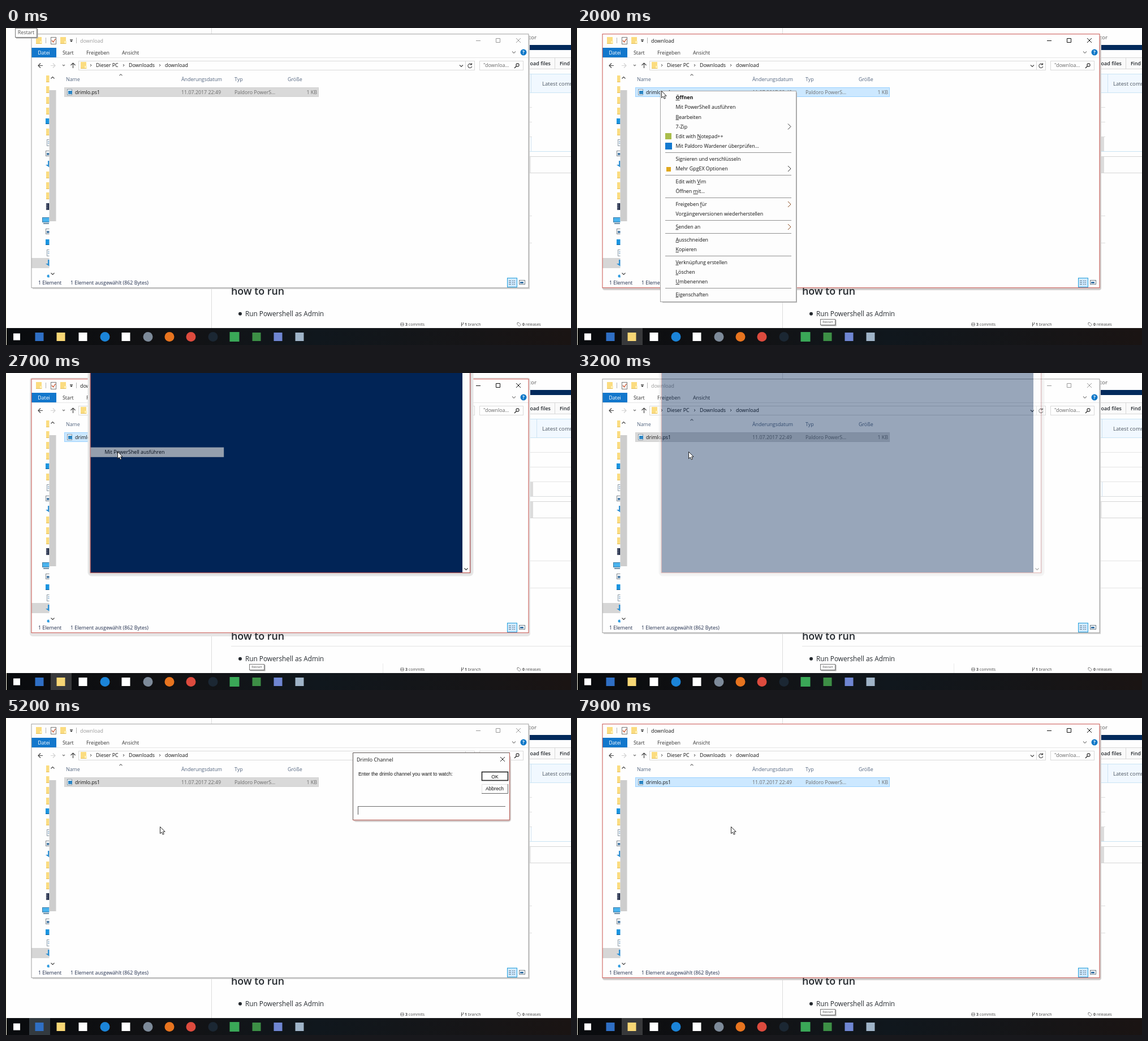
An HTML page that plays this animation: 999x561 px, repeating every 8 s.

```html
<!DOCTYPE html>
<html lang="de">
<head>
<meta charset="utf-8">
<title>Script aus dem Ordner starten</title>
<style>
html, body { margin: 0; width: 100%; height: 100%; overflow: hidden; background: #fefefe; }
svg { display: block; width: 999px; height: 561px; }
text { font-family: "Open Sans", "Noto Sans", sans-serif; font-size: 8.85px; white-space: pre; }
.form { font-family: "Liberation Sans", Arial, sans-serif; font-size: 8.6px; }
.u { text-decoration: underline; }
</style>
</head>
<body>
<svg id="stage" viewBox="0 0 999 561" xmlns="http://www.w3.org/2000/svg"></svg>
<script>
const LOOP = 8000, STEP = 100;

const rect = (x, y, w, h, fill, more = '') =>
  `<rect x="${x}" y="${y}" width="${w}" height="${h}" fill="${fill}" ${more}/>`;
const box = (x, y, w, h, fill, stroke, more = '') =>
  rect(x + .5, y + .5, w - 1, h - 1, fill, `stroke="${stroke}" ${more}`);
const line = (d, stroke, width = 1, more = '') =>
  `<path d="${d}" fill="none" stroke="${stroke}" stroke-width="${width}" ${more}/>`;
const shape = (d, fill) => `<path d="${d}" fill="${fill}"/>`;
const dot = (x, y, r, fill) => `<circle cx="${x}" cy="${y}" r="${r}" fill="${fill}"/>`;
const text = (x, y, s, fill = '#111', more = '') =>
  `<text x="${x}" y="${y}" fill="${fill}" ${more}>${s.replace(/_(.)/, '<tspan class="u">$1</tspan>')}</text>`;
const size = px => `style="font-size:${px}px"`;
const group = (id, body) => `<g id="${id}">${body}</g>`;
const right = (x, y, r, color) => line(`M${x} ${y - r}l${r} ${r}l${-r} ${r}`, color);
const down = (x, y, r, color) => line(`M${x - r} ${y - r / 2}l${r} ${r}l${r} ${-r}`, color, 1.1);
const up = (x, y, r, color) => line(`M${x - r} ${y + r / 2}l${r} ${-r}l${r} ${r}`, color, 1.1);
const folder = (x, y) => rect(x, y, 10, 12, '#fbdc80') + rect(x + 7, y + 7, 4, 5, '#fff0b5') + line(`M${x} ${y + 11.5}h10`, '#e3bd58');
const cross = (x, y, color) => line(`M${x - 4} ${y - 4}l8 8m0 -8l-8 8`, color);

function page() {
  const stat = (x, n, word) =>
    text(x, 527, `<tspan font-weight="700">${n}</tspan> ${word}`, '#4a4a4a', size(7));
  return rect(0, 0, 999, 561, '#fefefe')
    + line('M363.5 0V531', '#dcdcdc')
    + text(938, 20, 'ditor', '#555', 'text-anchor="end" ' + size(9.8))
    + rect(924, 30, 75, 9, '#032a5c')
    + box(900, 52, 71, 21, '#fafafa', '#d8d8d8') + box(970, 52, 40, 21, '#fafafa', '#d8d8d8')
    + text(963, 66, 'Upload files', '#24292e', 'text-anchor="end" font-weight="600" ' + size(9))
    + text(979, 66, 'Find file', '#24292e', 'font-weight="600" ' + size(8.7))
    + rect(924, 82, 75, 32, '#f1f8ff') + line('M924 81.5H999M924 114.5H999M924 218.5H999', '#c9e4f4')
    + text(948, 102, 'Latest commit', '#4d5660', size(9.6))
    + line('M924 227.5H999M924 256.5H999', '#d6d6d6')
    + line('M924 140.5h6m-6 26h6m-6 26h6m-6 140h6m-6 48h6', '#dedede')
    + group('edgeIdle', rect(924, 228, 4, 28, '#e8e8e8') + line('M928.5 82V114M928.5 193V218', '#cfe3f2'))
    + group('edgeBusy', line('M938.5 82V114', '#cfe3f2') + rect(924, 192, 8, 26, '#dcdcdc') + rect(924, 228, 8, 28, '#dcdcdc')
      + line('M924 140.5h10m-10 26h10m-10 26h10m-10 140h10m-10 48h10', '#dedede'))
    + group('pageLines', line('M398 483.5H999M924 140.5H999M924 166.5H999M924 192.5H999M924 332.5H999M924 380.5H999', '#e4e4e4')
      + line('M924 218.5H999', '#d9dcde') + line('M666.5 514V531', '#ececec'))
    + dot(414, 505.7, 3, '#24292e')
    + text(423, 510, 'Run Powershell as Admin', '#24292e', size(11.8))
    + line('M697 524.5h7m-6 -2.5h5v5h-5z', '#666', .8) + stat(706, 3, 'commits')
    + line('M805.5 521v7M808.5 521v2q0 2 -3 2.5', '#555', 1) + stat(811, 1, 'branch')
    + line('M904 521.5h3l3.5 3.5l-3 3l-3.5 -3.5z', '#666', .8) + stat(913, 0, 'releases');
}

// Partly covered icons of the folder tree, top to bottom.
function tree() {
  const icon = {
    f: y => rect(71, y - 6, 6, 12, '#fbdc80') + line(`M71 ${y + 5.5}h6`, '#e3bd58'),
    b: y => rect(70, y - 5, 7, 10, '#1b95e0') + line(`M70 ${y + 4.5}h7`, '#0a5c98'),
    d: y => box(72, y - 6, 8, 12, '#fff', '#8c9aa6') + line(`M74 ${y - 2}h3m-3 3h3`, '#4e86b5'),
    p: y => box(70, y - 5, 9, 10, '#fff', '#7f8890') + rect(72, y - 1, 5, 4, '#4d7ea8'),
    a: y => shape(`M74 ${y - 6}h3V${y + 6}l-7 -5h4z`, '#2d8fd2'),
    v: y => rect(71, y - 6, 6, 12, '#25304a') + line(`M72.5 ${y - 5}V${y + 5}`, '#ccd', 1.2, 'stroke-dasharray="1.5 1.5"')
  };
  const list = (s, y0, gap) => [...s].map((k, i) => icon[k](Math.round(y0 + i * gap))).join('');
  return rect(45, 407, 32, 18, '#d6d6d6')
    + list('ffffbfdpafffv', 90, 18.85)
    + box(64, 335, 14, 9, '#49b3ee', '#3d7ba5') + rect(66, 345, 10, 2, '#6d8da5')
    + list('pbda', 360, 18.8) + dot(75, 439, 2.5, '#2d9be0')
    + rect(76.5, 82, 12.5, 358, '#fefefe') + rect(76.5, 110, 12, 232, '#cdcdcd')
    + up(82.5, 88, 3, '#444') + down(82.5, 435, 3, '#444');
}

function explorer() {
  const head = '#53657f', path = '#111';
  return group('shadowIdle', rect(47, 13, 879, 449, '#d4d4d4'))
    + group('shadowWide', rect(42, 8, 885, 458, '#e6e5e5', 'rx="5"'))
    + group('shadowBusy', rect(45, 14, 882, 450, '#d2cecd', 'rx="4"'))
    + text(398, 472.3, 'how to run', '#24292e', 'font-weight="600" ' + size(17.9))
    + rect(45, 10, 879, 450, '#fefefe')
    + folder(53, 16) + line('M70.5 17V27M124.5 17V27', '#b5b5b5')
    + box(79, 16, 10, 13, '#fff', '#777') + line('M81 22l2.5 3l4 -6', '#c8502b', 1.3)
    + folder(96, 16) + shape('M113 22h5l-2.5 3z', '#333') + line('M113 20.5h5', '#333')
    + text(131, 26, 'download', '#999', 'id="title"')
    + `<g id="buttons">${line('M831 22.5h8M866.5 18.5h7v7h-7z', 'currentColor')}${cross(906, 22, 'currentColor')}</g>`
    + rect(45, 35, 44, 17, '#1277cc') + text(67, 47, 'Datei', '#fff', 'text-anchor="middle"')
    + text(100, 47, 'Start', '#333') + text(142, 47, 'Freigeben', '#333') + text(205, 47, 'Ansicht', '#333')
    + line('M45 52.5H924', '#e6e6e6')
    + down(898, 43, 3, '#888') + dot(915, 43, 5.5, '#0f78c8')
    + text(915, 46, '?', '#fff', 'text-anchor="middle" font-weight="700" ' + size(8))
    + line('M65 66.5H57m4 -4l-4 4l4 4', '#444', 1.2) + line('M79 66.5h8m-4 -4l4 4l-4 4', '#d2d2d2', 1.2)
    + down(102, 66, 2, '#777') + line('M118.5 71V62m-4 4l4 -4l4 4', '#444', 1.2)
    + box(128, 58, 701, 17, '#fefefe', '#d9d9d9') + line('M812.5 58V75', '#d9d9d9')
    + folder(132, 60)
    + right(149, 66, 2, '#444') + text(159, 69, 'Dieser PC', path)
    + right(207, 66, 2, '#444') + text(217, 69, 'Downloads', path)
    + right(271, 66, 2, '#444') + text(281, 69, 'download', path)
    + down(805, 67, 3, '#444') + line('M823 64.5a3.6 3.6 0 1 0 .8 3.5M823.5 62v3h-3', '#444', 1.1)
    + box(837, 58, 78, 17, '#fefefe', '#d9d9d9') + text(844, 69, '"downloa...', '#666')
    + `<circle cx="904.5" cy="65.5" r="2.6" fill="none" stroke="#333" stroke-width="1.1"/>` + line('M902.5 67.5l-3.5 3.5', '#333', 1.4)
    + text(106, 94, 'Name', head) + text(310, 94, 'Änderungsdatum', head)
    + text(404, 94, 'Typ', head) + text(498, 94, 'Größe', head) + up(203, 83, 2.5, '#777')
    + box(103, 105, 450, 17, '#d9d9d9', '#d2d2d2', 'id="row"')
    + box(108, 108, 9, 11, '#fff', '#8a9aa8') + rect(110, 111, 7, 6, '#2c86c4')
    + text(122, 117, 'drimlo.ps1') + text(310, 117, '11.07.2017 22:49', '#6d6d6d')
    + text(404, 117, 'Paldoro PowerS...', '#6d6d6d') + text(550, 117, '1 KB', '#6d6d6d', 'text-anchor="end"')
    + tree()
    + text(57, 454, '1 Element', '#1e2b4a') + text(114, 454, '1 Element ausgewählt (862 Bytes)', '#1e2b4a')
    + box(886, 442, 18, 17, '#cce8ff', '#26a0da')
    + line('M889 447.5h4m-4 3h4m-4 3h4', '#6a7a86') + line('M895 447.5h6m-6 3h6m-6 3h6', '#6a7a86', 1, 'stroke-dasharray="2 1"')
    + box(907, 446, 11, 8, '#fff', '#6a7a86') + rect(909, 449, 6, 3, '#3b74a6')
    + box(44.5, 10.2, 880, 450, 'none', '#a0a0a0', 'id="frame"');
}

function taskbar() {
  const sq = (x, w, fill) => rect(x - w / 2, 546.5 - w / 2, w, w, fill);
  const disc = (x, fill) => dot(x, 546.5, 8.5, fill);
  return rect(1, 531, 998, 30, 'url(#bar)')
    + group('taskShell', rect(41, 531, 37, 30, '#333a40'))
    + group('taskFiles', rect(79, 531, 37, 30, '#38393b'))
    + sq(19, 12, '#fff') + sq(59, 15, '#2f6fc4') + sq(97, 15, '#f8d775') + sq(136, 15, '#fff')
    + disc(175, '#1b84d8') + sq(212, 15, '#fff') + disc(251, '#7d8a99') + disc(289, '#e8741f')
    + disc(327, '#dd4b3e') + disc(366, '#1b2733') + sq(404, 17, '#3aa757') + sq(443, 15, '#3d8f46')
    + sq(481, 15, '#6f86d2') + sq(519, 15, '#9fb4c8');
}

const ITEM = 'Mit PowerShell ausführen';
function menu() {
  const items = [
    [123, '_Öffnen'], [140, ITEM], [157.5, '_Bearbeiten'], [174.5, '7-Zip', '#333'],
    [192, 'Edit with _Notepad++'], [209, 'Mit Paldoro Wardener überprüfen...'],
    [232, 'Signieren und verschlüsseln'], [249, 'Mehr GpgEX Optionen', '#333'],
    [272, 'Edit with _Vim'], [289, 'Öffnen _mit...'],
    [312, 'Freigeben _für', '#8a4b1f'], [329, 'Vor_gängerversionen wiederherstellen'],
    [352, '_Senden an', '#8a4b1f'], [374.5, '_Ausschneiden'], [392, '_Kopieren'],
    [414.5, '_Verknüpfung erstellen'], [432, '_Löschen'], [449, '_Umbenennen'], [471.5, '_Eigenschaften']
  ];
  return rect(151, 114, 238, 372, '#b4b4b4') + box(147, 111, 241, 374, '#fdfdfd', '#a3a3a3')
    + rect(149.5, 131.6, 235.7, 17.2, '#cfcfcf', 'id="hover"')
    + [220, 260, 300, 340, 363, 403, 460].map(y => line(`M156 ${y + .5}H379`, '#929292')).join('')
    + items.map(([y, s, arrow], i) => text(174.5, y + 3.3, s, '#111', i ? '' : 'font-weight="700"')
      + (arrow ? right(373, y, 5, arrow) : '')).join('')
    + rect(156, 186, 11, 11, '#a9bd4b') + rect(156, 203, 12, 12, '#1279cf') + rect(158, 246, 8, 8, '#e0a81e');
}

function shell() {
  return rect(144.5, -10, 682, 369.5, '#e6e6e6', 'rx="7"') + rect(147, -10, 676, 366, '#d9d8d8', 'rx="4"')
    + box(148.7, -5, 672.5, 359, '#012456', '#c4514b') + rect(807, 0, 13, 353, '#fdfdfd') + down(813.5, 347, 3, '#333');
}

function dialog() {
  return rect(614, 66, 279, 118, '#d6cecd', 'rx="5"') + rect(613, 61, 278, 119, '#fefefe')
    + line('M890.5 61V180.5H613', '#b5564f') + line('M613.5 180V61.5H890', '#5c5452')
    + text(620, 77, 'Drimlo Channel') + cross(878, 73, '#222')
    + text(623, 102, 'Enter the drimlo channel you want to watch:', '#111', 'class="form"')
    + box(841, 95, 47, 16, '#fefefe', '#222', 'stroke-width="1.6"')
    + text(864.5, 106.5, 'OK', '#111', 'class="form" text-anchor="middle"')
    + line('M841.5 133V117.5H887', '#e2e2e2') + line('M887.5 117V133.5H841', '#666')
    + text(864, 128, 'Abbrech', '#111', 'class="form" text-anchor="middle"')
    + line('M622.5 171V156.5H883', '#6b6b6b', 1.2)
    + text(624.5, 167, '', '#111', 'class="form" id="typed"')
    + rect(624, 158, 1, 11, '#000', 'id="caret"');
}

const tip = (id, x, y, w, h, px, ty) => group(id,
  rect(x + 1.5, y + 1.5, w, h, '#aaa') + box(x, y, w, h, '#fefefe', '#777')
  + text(x + w / 2, ty, 'Restart', '#555', `text-anchor="middle" ${size(px)}`));

document.getElementById('stage').innerHTML =
  '<defs><linearGradient id="bar"><stop stop-color="#090b0e"/><stop offset=".3" stop-color="#121214"/>'
  + '<stop offset=".55" stop-color="#10171d"/><stop offset="1" stop-color="#1a1413"/></linearGradient></defs>'
  + page() + explorer()
  + tip('tipTop', 16, 0, 39, 17, 8.85, 11) + tip('tipLow', 430, 515, 27, 11, 5.6, 522.3)
  + taskbar() + group('menu', menu()) + group('shell', shell())
  + group('chosen', rect(149.5, 131.6, 235.7, 17.2, '#cfcfcf') + text(174.5, 143.3, ITEM, '#000'))
  + group('dialog', dialog())
  + rect(0, 0, 1, 561, '#fffde8')
  + group('cursor', '<path d="M.5 .5V12.6L3.3 10L5.2 14.2L7.3 13.3L5.5 9.2H9.2Z" fill="#fff" stroke="#111" stroke-width=".9"/>');

const el = {};
document.querySelectorAll('[id]').forEach(e => el[e.id] = e);
const show = (id, on) => el[id].style.display = on ? '' : 'none';
const within = (t, a, b) => t >= a && t < b;
const clamp = v => Math.max(0, Math.min(1, v));

// Pointer stops: time, x, y.
const STOPS = [[600, 20, -14], [1300, 149, 111], [2000, 149, 111], [2500, 197, 139], [3300, 197, 139], [3700, 272, 192]];
function pointer(t) {
  let p = STOPS[0];
  for (const q of STOPS) {
    if (t < q[0]) {
      const k = clamp((t - p[0]) / (q[0] - p[0]));
      return [p[1] + (q[1] - p[1]) * k, p[2] + (q[2] - p[2]) * k];
    }
    p = q;
  }
  return [p[1], p[2]];
}

function draw(t) {
  const active = within(t, 1600, 2800) || t >= 7500;
  const shellOpen = within(t, 2700, 3300);
  const [x, y] = pointer(t);

  show('shadowIdle', !active);
  show('shadowBusy', active && !shellOpen);
  show('shadowWide', active && shellOpen);
  show('edgeIdle', !active);
  show('edgeBusy', active);
  show('pageLines', shellOpen);
  el.title.setAttribute('fill', active ? '#111' : '#999');
  el.buttons.style.color = active ? '#111' : '#999';
  el.frame.setAttribute('stroke', active ? '#c8524c' : '#a0a0a0');
  const lit = active || within(t, 1200, 1600);
  el.row.setAttribute('fill', lit ? '#cce8ff' : '#d9d9d9');
  el.row.setAttribute('stroke', lit ? '#99d1ff' : '#d2d2d2');

  show('tipTop', t < 700);
  show('tipLow', within(t, 1000, 3900) || t >= 5800);
  show('taskFiles', active);
  show('taskShell', within(t, 2800, 3200) || within(t, 3600, 7500));

  show('menu', within(t, 1600, 2700));
  el.menu.style.opacity = t < 1700 ? .6 : 1;
  show('hover', t >= 2100);
  el.hover.setAttribute('y', y < 132 ? 114.5 : 131.6);
  show('shell', shellOpen);
  el.shell.style.opacity = t < 3200 ? 1 : .4;
  show('chosen', within(t, 2700, 3000));
  el.chosen.style.opacity = .72 * clamp(1 - (t - 2700) / 300);

  show('dialog', within(t, 3600, 7500));
  el.dialog.style.opacity = t < 3700 ? .6 : t < 7400 ? 1 : .5;
  const count = t < 7000 ? Math.floor((t - 6600) / 100) : Math.floor((t - 6700) / 100);
  const word = 'kanal7'.slice(0, Math.max(0, count));
  el.typed.textContent = word;
  el.caret.setAttribute('x', 624 + (word ? Math.round(el.typed.getComputedTextLength()) + 1 : 0));
  show('caret', t < 3900 || t >= 6400 || Math.floor((t - 3900) / 500) % 2 === 1);

  show('cursor', t >= 700);
  el.cursor.setAttribute('transform', `translate(${Math.round(x)} ${Math.round(y)})`);
}

const start = performance.now();
function tick() {
  const t = (performance.now() - start) % LOOP;
  draw(Math.floor(t / STEP) * STEP);
  requestAnimationFrame(tick);
}
tick();
</script>
</body>
</html>
```
